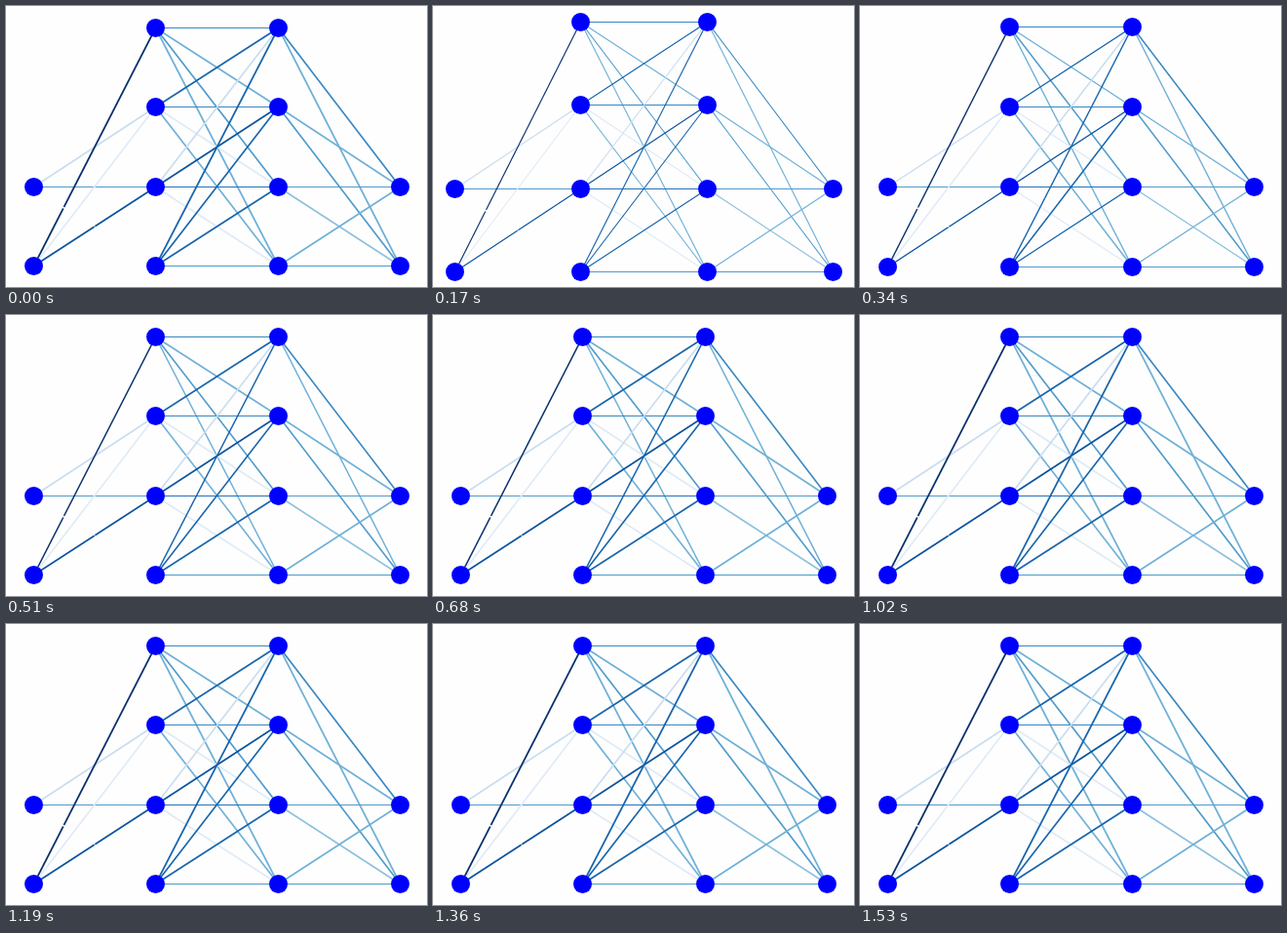
Recreate the animation shown at these times as an HTML page with a canvas. Size 432x288 px, loop 6.95 s.

```html
<!DOCTYPE html>
<html lang="en">
<head>
<meta charset="utf-8">
<title>Layered network</title>
<style>
  html, body { margin: 0; width: 100%; height: 100%; overflow: hidden; background: #fefefe; }
  canvas { display: block; }
</style>
</head>
<body>
<canvas id="stage" width="432" height="288"></canvas>
<script>
const ctx = document.getElementById('stage').getContext('2d');
const LOOP = 6950, STEP = 170, LAST = 9, RADIUS = 9.5;
const PAPER = '#fefefe';

// First occupied row of each column; every column ends at row 3.
const firstRow = [2, 0, 0, 2];

// Light to dark; each digit in weights indexes this scale.
const blues = ['#dfebf7', '#c9ddf0', '#8fc1de', '#6fb0d7', '#4f9bcb',
               '#3888c1', '#2474b7', '#1865ac', '#0a539e', '#08306b'];

// One string per starting node, one digit per end row, dots for no link.
const weights = [
  ['.14.', '908.'],
  ['5343', '7503', '1860', '7774'],
  ['..53', '..34', '..42', '..34']
];

function layout(step) {
  const [left, right, top, bottom] =
    step === 1 ? [22.5, 410.5, 16.5, 272.5] :
    step === 2 ? [28.5, 404.5, 21.5, 267.5] : [28.5, 404.5, 22.5, 266.5];
  const place = (a, b, i) => Math.floor(a + (b - a) * i / 3) + 0.5;
  return (col, row) => [place(left, right, col), place(top, bottom, row)];
}

function line(a, b, color, width) {
  ctx.strokeStyle = color;
  ctx.lineWidth = width;
  ctx.beginPath();
  ctx.moveTo(...a);
  ctx.lineTo(...b);
  ctx.stroke();
}

// Hairline break part of the way along a link.
function gap(a, b, part) {
  const at = p => [0, 1].map(i => a[i] + (b[i] - a[i]) * p);
  line(at(part - 0.003), at(part + 0.003), PAPER, 2);
}

function draw(step) {
  const node = layout(step);
  const width = 1.75 - 0.6 / (step || LAST + 1);
  ctx.fillStyle = PAPER;
  ctx.fillRect(0, 0, 432, 288);

  weights.forEach((starts, col) => starts.forEach((ends, i) => {
    const from = firstRow[col] + i;
    [...ends].forEach((shade, to) => {
      if (shade === '.') return;
      line(node(col, from), node(col + 1, to), blues[shade], from === to ? 1 : width);
    });
  }));

  gap(node(0, 3), node(1, 2), 0.5);
  gap(node(0, 3), node(1, 0), 0.245);

  ctx.fillStyle = '#00f';
  firstRow.forEach((first, col) => {
    for (let row = first; row < 4; row++) {
      ctx.beginPath();
      ctx.arc(...node(col, row), RADIUS, 0, 2 * Math.PI);
      ctx.fill();
    }
  });
}

function tick() {
  draw(Math.min(LAST, Math.floor(performance.now() % LOOP / STEP)));
  requestAnimationFrame(tick);
}
tick();
</script>
</body>
</html>
```
